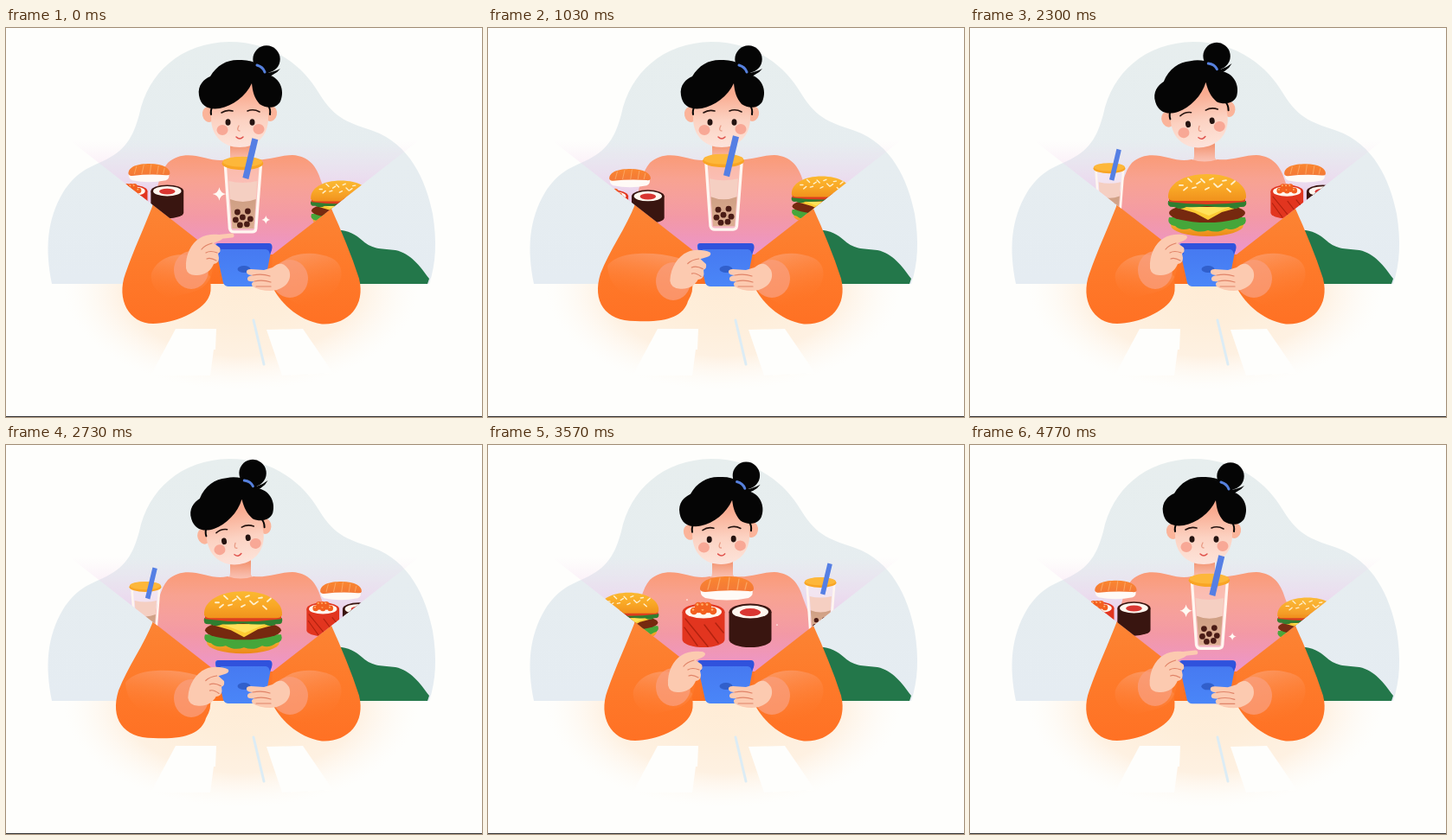
Animation of 550 by 450 pixels, one loop 4810 ms. Source, as an HTML page with a canvas:

```html
<!DOCTYPE html>
<html lang="en">
<head>
<meta charset="utf-8">
<title>Food menu</title>
<style>
html, body { margin: 0; width: 100%; height: 100%; overflow: hidden; background: #fefefc; }
canvas { display: block; }
</style>
</head>
<body>
<canvas id="stage" width="550" height="450"></canvas>
<script>
const ctx = document.getElementById('stage').getContext('2d');
const LOOP = 4810, STEP = LOOP / 3, TAU = Math.PI * 2;
const CENTER = 274, SPACING = 111.5;
const SKIN = '#fccab0', HAIR = '#050505', CREASE = '#e08468';

const clamp = v => Math.max(0, Math.min(1, v));
const lerp = (a, b, u) => a + (b - a) * u;
const cubic = v => { const u = clamp(v); return u < .5 ? 4 * u ** 3 : 1 - 4 * (1 - u) ** 3; };
const ramp = (t, from, to) => { const u = clamp((t - from) / (to - from)); return u * u * (3 - 2 * u); };

function fill(d, color) { ctx.fillStyle = color; ctx.fill(new Path2D(d)); }

function stroke(d, color, width) {
  ctx.strokeStyle = color;
  ctx.lineWidth = width;
  ctx.lineCap = ctx.lineJoin = 'round';
  ctx.stroke(new Path2D(d));
}

function oval(x, y, rx, ry, color, angle = 0) {
  ctx.fillStyle = color;
  ctx.beginPath();
  ctx.ellipse(x, y, rx, ry, angle, 0, TAU);
  ctx.fill();
}

function addStops(g, colors) {
  colors.forEach((c, i) => g.addColorStop(i / (colors.length - 1), c));
  return g;
}
const linear = (x0, y0, x1, y1, ...colors) => addStops(ctx.createLinearGradient(x0, y0, x1, y1), colors);
const radial = (x, y, r, ...colors) => addStops(ctx.createRadialGradient(x, y, 0, x, y, r), colors);

function group(draw) { ctx.save(); draw(); ctx.restore(); }

function star(x, y, r) {
  const q = r * .15;
  fill(`M${x} ${y - r}Q${x + q} ${y - q} ${x + r} ${y}Q${x + q} ${y + q} ${x} ${y + r}` +
    `Q${x - q} ${y + q} ${x - r} ${y}Q${x - q} ${y - q} ${x} ${y - r}Z`, '#fffaf4');
}

function drawScenery() {
  ctx.fillStyle = '#fefefc';
  ctx.fillRect(0, 0, 550, 450);
  fill('M53 296C45 256 47 222 66 190C80 168 94 162 112 154C138 142 147 126 154 100C164 52 202 17 258 16' +
    'C310 16 344 45 362 76C380 106 398 110 424 119C466 134 485 175 493 215C498 246 497 272 489 296Z',
    linear(0, 16, 0, 296, '#e7eeee', '#e5ecf2'));
  fill('M366 238C385 229 400 235 412 246C424 257 436 255 450 257C468 261 478 275 489 290L487 296H360Z', '#23774a');
  group(() => {
    ctx.beginPath();
    ctx.rect(0, 296, 550, 130);
    ctx.clip();
    ctx.translate(272, 300);
    ctx.scale(1, .58);
    oval(0, 0, 205, 205, radial(0, 0, 205, '#ffecd6', '#feeeda', '#fef1e2', 'rgba(255,250,244,0)'));
  });
  fill('M196 348H243L242 372H240L236 402H167Z', '#fefefc');
  fill('M301 349L343 348L378 399L319 402Z', '#fefefc');
  stroke('M286 338L298 389', '#dcecf5', 3);
  ctx.fillStyle = '#333';
  ctx.fillRect(0, 449, 550, 1);
}

function drawTorso() {
  fill('M259 132H283V150Q286 156 290 158H252Q259 155 259 148Z', linear(0, 136, 0, 156, '#f3936d', '#fcc4aa'));
  fill('M169 207C175 185 178 166 187 156C199 145 214 146 229 150C240 153 248 154 256 152Q271 157 286 152' +
    'C300 154 317 147 331 147C350 148 359 160 364 177L376 209L310 296H235Z',
    linear(0, 148, 0, 296, '#fb9262', '#fb8a50', '#fd7a2c', '#fe7020'));
}

function drawRightArm() {
  fill('M376 209L308 262L306 296C315 316 336 338 365 342.500C394 344 416 322 408 290C399 262 388 236 376 209Z',
    linear(0, 207, 0, 342, '#fc8434', '#fe7a2a', '#ff7124'));
  fill('M316 274C330 258 358 258 376 266C398 277 388 310 350 324C330 319 316 306 309 294Z',
    linear(340, 258, 358, 318, 'rgba(252,155,105,.85)', 'rgba(255,125,50,0)'));
  oval(328, 290, 21, 22, 'rgba(250,158,125,.75)');
}

// k = 0: hand raised beside the phone, k = 1: hand lowered
function drawLeftArm(k) {
  const m = (a, b) => lerp(a, b, k);
  fill(`M170 204C160 230 ${m(147, 140)} 258 ${m(138, 130)} 284C${m(127, 120)} ${m(314, 316)} ${m(142, 135)} ${m(342, 339)} 170 ${m(342, 339)}` +
    `C${m(194, 205)} ${m(342, 341)} ${m(226, 226)} ${m(328, 334)} ${m(234, 231)} ${m(312, 316)}Q238 305 236 292L243 261Z`,
    linear(0, 205, 0, 342, '#fc8434', '#fe7a2a', '#ff7124'));
  fill(`M${m(168, 138)} ${m(284, 275)}C${m(176, 150)} ${m(262, 258)} ${m(204, 190)} 258 220 266L236 288` +
    `C230 ${m(305, 312)} 212 ${m(306, 315)} 190 ${m(312, 318)}C${m(176, 150)} 308 ${m(166, 140)} 298 ${m(168, 138)} ${m(284, 275)}Z`,
    linear(200, 260, 190, 316, 'rgba(252,155,105,.85)', 'rgba(255,125,50,0)'));
  oval(214, m(280, 293), 20, 22, 'rgba(250,158,125,.75)');
}

function drawLeftHand(k, pointing, press) {
  group(() => {
    ctx.translate(lerp(0, 2, k) - press * 4, lerp(0, 15, k));
    ctx.translate(215, 280);
    ctx.rotate(k * .12);
    ctx.translate(-215, -280);
    if (pointing > .05) stroke(`M232 243L${242 + 19 * pointing} ${242 - 2 * pointing}`, SKIN, 5);
    fill('M208 278C207 262 214 249 224 243C232 238 243 238 250 240Q253 243 247 246L240 249L247 254' +
      'Q249 259 245 261L246 266Q246 272 240 273C237 281 229 286 221 286Q210 287 208 278Z', SKIN);
    stroke('M238 249Q230 251 226 256M244 260Q236 257 231 260M243 269Q236 265 232 267', CREASE, 1.2);
  });
}

function drawPhone() {
  fill('M245 249H304Q308 249 307 254L299 295Q298 299 294 299H257Q253 299 251 295L242 254Q241 249 245 249Z',
    linear(0, 249, 0, 299, '#4678f0', '#4a86f8'));
  fill('M245 249H304Q309 250 307 257L305 262Q304 256 300 256H249Q246 256 247 262L243 257Q241 250 245 249Z', '#3052dc');
  oval(275, 279, 7.5, 4, '#315fcb');
}

function drawRightHand() {
  fill('M327 280C322 272 316 270 308 277L298 280L283 279Q277 279 278 283Q279 286 285 286Q278 287 279 291' +
    'Q280 294 287 293Q282 295 285 299Q293 304 305 304C320 304 332 293 327 280Z', SKIN);
  stroke('M285 286Q296 284 305 287M287 293Q297 291 306 294M289 299Q299 299 306 299', CREASE, 1.2);
}

function drawHead(angle) {
  ctx.translate(270, 140);
  ctx.rotate(-angle);
  ctx.translate(-270, -140);
  oval(234, 100, 7, 9, '#fbb49a', -.2);
  oval(306, 99, 7, 9, '#fbb49a', .2);
  fill('M237 60H303V104C303 125 289 138 270 138C251 138 237 125 237 104Z',
    linear(0, 76, 0, 138, '#f9ab90', '#fcd2c2', '#fde4da'));
  oval(250, 118, 6.5, 6, '#f8a896');
  oval(292, 117, 6.5, 6, '#f8a896');
  oval(256.5, 109, 3, 3.8, '#241310');
  oval(284.5, 109, 3, 3.8, '#241310');
  stroke('M249 98Q255 94 262 96M279 96Q286 93 293 97', '#25130f', 1.6);
  stroke('M269 113Q266 119 270 119', '#e99c86', 1.3);
  stroke('M266 126Q270 130 274 126', '#e0524c', 1.5);
  stroke('M239 90Q236 95 237 100M303 90Q306 94 305 100', HAIR, 2);
  oval(301, 36, 15.7, 15.7, HAIR);
  fill('M288 52Q305 54 317 47Q310 57 293 57Z', HAIR);
  fill('M223 78C221 66 229 59 236 56C244 42 257 36 270 37C286 36 300 45 306 55C318 60 322 74 317 85' +
    'C312 94 300 93 293 88C287 81 285 74 284 64C277 79 262 90 247 93C235 95 225 91 223 78Z', HAIR);
  stroke('M290 43Q297 45 299 51', '#5680dd', 3);
}

function drawTea() {
  fill('M251 158H294L288 236H258Z', 'rgba(255,240,242,.35)');
  fill('M256 177Q272 181 289 177L285 232H260Z', '#f5cfc2');
  fill('M257.500 198Q272 204 287.500 198L285 232H260Z', linear(0, 198, 0, 232, '#cf9f84', '#dcae92'));
  for (const [x, y] of [[266, 213], [278, 212], [272, 219], [264, 222], [281, 221], [269, 228], [277, 227]])
    oval(x, y, 3.4, 3.4, '#4a1c16');
  stroke('M252 160L257 232Q258 236 262 236H283Q287 236 287.500 232L293 160', '#fff6f0', 3.3);
  oval(272, 156.500, 24, 7.500, '#f9a524');
  oval(272, 154.500, 23, 6, '#fdb73a');
  fill('M283 127L290 129L279 175L272 173Z', '#557fe4');
}

function drawBurger() {
  oval(274, 228, 42, 13, linear(0, 225, 0, 241, '#f6b236', '#ec8716'));
  fill('M230 219H318Q321 227 312 229Q304 235 296 232Q286 238 275 234Q264 238 254 232Q243 235 237 229Q227 227 230 219Z', '#45a63a');
  oval(274, 214, 44, 11, '#76290f');
  fill('M236 207H313L291 213L275 222L260 214Z', '#fccb33');
  fill('M250 207H300L276 217Z', '#ffe25a');
  fill('M229 200H319Q321 208 312 207Q306 211 299 207Q287 208 274 206Q260 208 250 207Q243 211 236 207Q227 208 229 200Z', '#2f7e30');
  fill('M230 195H318V201Q274 207 230 201Z', '#dd3e1e');
  fill('M229 196C228 180 248 169 274 169C300 169 320 180 319 196Q318 200 312 200H236Q230 200 229 196Z',
    linear(0, 169, 0, 201, '#fbb930', '#f9a826', '#f0901c'));
  for (let i = 0; i < 13; i++) {
    const x = 244 + i * 5, y = 182 + Math.sin(i * 2.4) * 6 - (i > 2 && i < 10 ? 2 : 0);
    const tilt = Math.sin(i * 4.1) * 2;
    stroke(`M${x - 2} ${y - tilt}L${x + 2} ${y + tilt}`, '#fff0cc', 1.8);
  }
}

function drawRoll(x, body) {
  fill(`M${x - 24.5} 190V222A24.5 9 0 0 0 ${x + 24.5} 222V190Z`, body);
  oval(x, 190, 24.5, 9.5, body);
  oval(x, 190, 21, 7.5, '#fff6ee');
}

function drawSushi() {
  fill('M246 162H305Q308 171 301 174Q276 179 251 174Q244 171 246 162Z', '#fffaf6');
  fill('M245 164C245 153 259 149 277 149C297 149 308 156 307 164Q306 167 301 166Q276 164 251 167Q246 167 245 164Z',
    linear(0, 149, 0, 167, '#fa862f', '#f37838'));
  stroke('M257 153L254 164M268 151L265 164M279 150L277 164M290 152L288 164M299 156L297 164', '#fba460', 1.3);
  drawRoll(249, '#e2351f');
  stroke('M227 208L242 229M228 198L254 230M250 205L266 226M263 203L272 214', '#b3220f', 1.5);
  for (let i = 0; i < 8; i++) {
    const x = 238 + (i % 5) * 5.5 + (i > 4 ? 5 : 0), y = i > 4 ? 183 : 189 - (i % 2) * 2;
    oval(x, y, 4.3, 4.3, '#f35f1f');
    oval(x - 1, y - 1.5, 1.3, 1.3, '#ffb068');
  }
  drawRoll(303, '#391510');
  oval(303, 190.5, 12, 4.5, '#d93632');
}

const dishes = [
  { draw: drawTea, pivot: 185, phase: .73, lift: -2, stars: [[245, 192, 8], [299, 222, 5]] },
  { draw: drawBurger, pivot: 200, phase: 1.19, lift: -2.5, stars: [[291, 162, 9], [223, 202, 7], [316, 235, 5]] },
  { draw: drawSushi, pivot: 198, phase: -1.63, lift: 0, stars: [[230, 176, 9], [334, 205, 9]] }
];

function drawDish(dish, slot, t, glow) {
  const far = Math.abs(slot);
  const size = 1 - .23 * Math.min(far, 1);
  const bob = dish.lift + 3.1 * Math.sin(t / LOOP * 2 * TAU + dish.phase);
  group(() => {
    ctx.globalAlpha = clamp(2 - far);
    ctx.translate(CENTER + slot * SPACING, dish.pivot + bob);
    ctx.scale(size, size);
    ctx.translate(-CENTER, -dish.pivot);
    dish.draw();
    if (far < .6 && glow > 0)
      for (const [x, y, r] of dish.stars) star(x, y, r * glow);
  });
}

function drawMenu(t) {
  const n = Math.floor(t / STEP), p = t % STEP;
  const position = n - 1 + cubic((p + STEP - 1106) / 583) + cubic((p - 1106) / 583);
  const sinceSparkle = (p + STEP - 1300) % STEP;
  const glow = sinceSparkle < 700 ? Math.sin(Math.PI * sinceSparkle / 700) : 0;
  group(() => {
    ctx.clip(new Path2D('M42 105L243 262H308L509 105Z'));
    ctx.fillStyle = linear(0, 130, 0, 262, 'rgba(244,205,238,0)', 'rgba(243,195,236,.38)',
      'rgba(238,165,222,.64)', 'rgba(232,155,238,.85)');
    ctx.fillRect(42, 130, 467, 132);
    const first = Math.floor(position) - 1;
    for (let k = first; k < first + 5; k++)
      if (Math.abs(k - position) < 2) drawDish(dishes[(k + 6) % 3], k - position, t, glow);
  });
}

function drawScene(t) {
  const p = t % STEP;
  const sincePoint = (p + STEP - 1250) % STEP;
  const lowered = ramp(p, 750, 1000) - ramp(p, 1150, 1400);
  const pointing = ramp(sincePoint, 0, 150) - ramp(sincePoint, 450, 850);
  const press = ramp(p, 1280, 1420) - ramp(p, 1440, 1590);
  const tilt = .15 * (ramp(t, 1430, 1860) - ramp(t, 3200, 3700));

  drawScenery();
  drawTorso();
  group(() => drawHead(tilt));
  drawRightArm();
  group(() => {
    ctx.translate(-2 * press, 0);
    drawLeftArm(lowered);
  });
  drawMenu(t);
  group(() => {
    ctx.translate(-2 * press, 4 * press);
    drawPhone();
    drawRightHand();
  });
  drawLeftHand(lowered, pointing, press);
}

function frame() {
  drawScene(performance.now() % LOOP);
  requestAnimationFrame(frame);
}
frame();
</script>
</body>
</html>
```
